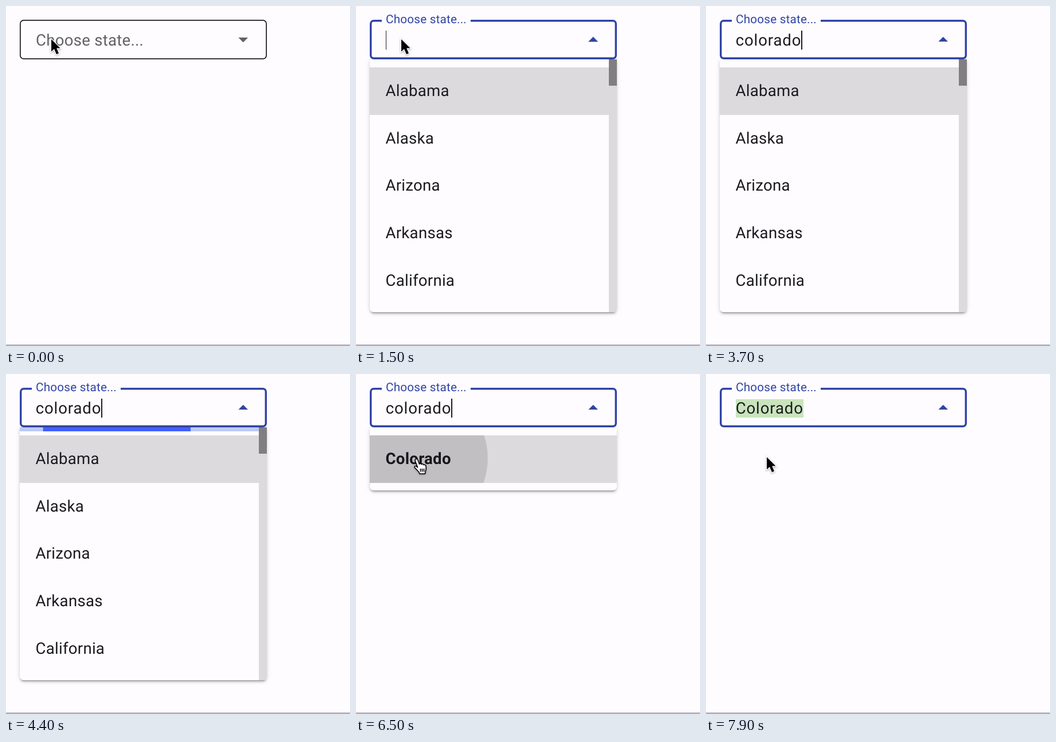
Write an HTML page that moves like this. It is 600 px wide and 593 px high and loops after 8 s.

```html
<!DOCTYPE html>
<html lang="en">
<head>
<meta charset="utf-8">
<title>State picker</title>
<style>
  :root { --paper: #fefcff; --ink: #1b1b1f; --primary: #3144a5; }
  html, body { margin: 0; width: 100%; height: 100%; overflow: hidden; background: var(--paper); }
  #stage {
    position: relative; width: 600px; height: 593px; overflow: hidden;
    font: 27.6px/32px Roboto, sans-serif; letter-spacing: .26px; color: var(--ink);
    text-rendering: geometricPrecision;
  }
  #stage div, #stage svg { position: absolute; box-sizing: border-box; }
  #rule { left: 0; top: 591px; width: 600px; height: 1px; background: #505054; }

  #outline { left: 24.2px; top: 24px; width: 431px; height: 69px; border-radius: 6.9px; box-shadow: inset 0 0 0 1.72px var(--ink); }
  #notch { left: 45px; top: 22px; width: 155px; height: 8px; background: var(--paper); }
  #label { left: 51.7px; top: 44px; color: #626166; white-space: nowrap; transform-origin: 0 50%; }
  #value { left: 51.7px; top: 44px; height: 32px; display: flex; letter-spacing: .8625px; }
  #caret { width: 1.7px; height: 33px; margin-top: -.7px; background: var(--ink); }
  #arrow { left: 405px; top: 54.8px; width: 17.4px; height: 8.7px; background: #626166; clip-path: polygon(0 0, 100% 0, 50% 100%); }
  .focused #outline { box-shadow: inset 0 0 0 3.45px var(--primary); }
  .focused #label { color: var(--primary); }
  .focused #arrow { background: var(--primary); transform: translateY(-1.2px) scaleY(-1); }
  .selected #text { background: #c9e4bd; }

  #panel {
    left: 24.2px; top: 93.3px; width: 431px; background: var(--paper);
    border-radius: 0 0 6.9px 6.9px; transform-origin: 50% 0;
    box-shadow: 0 5.2px 1.7px -3.4px #0003, 0 3.4px 3.4px #00000024, 0 1.7px 8.6px #0000001f;
  }
  #clip { inset: 0; overflow: hidden; border-radius: inherit; }
  .bone { left: 14px; width: 403px; height: 54.5px; border-radius: 6px; background: #e8e6e7; overflow: hidden; }
  .sheen { left: -135px; top: 0; width: 135px; height: 100%; background: linear-gradient(90deg, #eae9f000, #eae9f0 65%); }
  .row { left: 0; width: 100%; height: 82.76px; padding-left: 27.5px; line-height: 82.76px; overflow: hidden; }
  .row.active { background: #dcdadd; }
  #match { font-weight: 700; top: 13.8px; }
  #ripple { left: -369px; top: -410px; width: 900px; height: 900px; border-radius: 50%; background: #0000001f; }
  #track { right: 0; top: 0; width: 14px; height: 100%; background: #dcdadd; }
  #thumb { left: 0; top: 0; width: 14px; height: 46px; background: #807e81; }
  #progress { left: 0; top: 0; width: 100%; height: 6.9px; background: #bdcaf4; overflow: hidden; }
  .slide, .slide div { top: 0; width: 100%; height: 100%; }
  .slide div { left: 0; background: #4460fb; }
  #primary { left: -145.166611%; }
  #secondary { left: -54.888891%; }
  #pointer { left: 0; top: 0; width: 40px; height: 40px; overflow: visible; filter: drop-shadow(0 1.5px 1.5px #0005); }
</style>
</head>
<body>
<div id="stage">
  <div id="rule"></div>
  <div id="outline"></div>
  <div id="notch"></div>
  <div id="label">Choose state...</div>
  <div id="value"><span id="text"></span><span id="caret"></span></div>
  <div id="arrow"></div>
  <div id="panel"><div id="clip">
    <div id="skeleton" style="inset:0"></div>
    <div id="options" style="inset:0"></div>
    <div id="match" class="row active">Colorado<div id="ripple"></div></div>
    <div id="progress">
      <div id="primary" class="slide"><div></div></div>
      <div id="secondary" class="slide"><div></div></div>
    </div>
    <div id="track"><div id="thumb"></div></div>
  </div></div>
  <svg id="pointer">
    <path id="cursor" d="M0 0V21.5L5 17L9 26.3L13 24.6L9.2 15.6H15.6Z" stroke="#fff" stroke-width="2.6" paint-order="stroke"/>
    <g id="hand" transform="translate(-4.5 2)" fill="#fff" stroke="#000" stroke-width="1.6" stroke-linejoin="round">
      <path d="M3 1.2C4.8 .6 6 1.8 6.6 3.6L9 10.2C9.6 8.6 12.4 8.8 12.8 10.6C13.8 9.4 16.2 9.8 16.6 11.6C18 10.8 20.2 11.6 20.4 13.4C20.8 16 21 20 19.5 23L19 27H9.5C9 24.6 7 22.5 5 20.5L1 16.2C-.2 14.6 1.6 12.8 3.6 13.8L6 15.8L1.8 4.8C1.2 3.2 1.6 1.8 3 1.2Z"/>
      <path d="M11 18V23.5M14 18V23.5M17 18V23.5"/>
    </g>
  </svg>
</div>
<script>
const LOOP = 8000, STEP = 100;
const FOCUS = 300, LOADED = 1500, SEARCH = 3828, FILTERED = 5000, POINT = 5900, PICK = 6800;
const typed = [[FOCUS, 0], [1700, 1], [1900, 2], [2100, 3], [2300, 4], [2800, 5], [3000, 6], [3200, 7], [3400, 8]];

const $ = id => document.getElementById(id);
const show = (id, on) => { $(id).style.display = on ? '' : 'none'; };
const add = (parent, className, top, html) =>
  parent.insertAdjacentHTML('beforeend', `<div class="${className}" style="top:${top}px">${html}</div>`);

['Alabama', 'Alaska', 'Arizona', 'Arkansas', 'California', 'Colorado'].forEach((name, i) =>
  add($('options'), i ? 'row' : 'row active', 13.8 + i * 82.76, name));
for (let i = 0; i < 3; i++) add($('skeleton'), 'bone', 35.8 + i * 75.85, '<div class="sheen"></div>');

const motions = [];
function move(el, frames, delay, duration, easing = 'linear', fill = 'both') {
  const motion = el.animate(frames, { delay, duration, easing, fill });
  motion.pause();
  motions.push(motion);
}

// Each step: offset, value, control points of the easing to the next step
const track = (fn, unit, steps) => steps.map(([offset, value, curve]) => ({
  offset, transform: `${fn}(${value}${unit})`, easing: curve ? `cubic-bezier(${curve})` : 'linear'
}));
function slide(el, shift, scale) {
  move(el, track('translateX', '%', shift), SEARCH, 2000);
  move(el.firstChild, track('scaleX', '', scale), SEARCH, 2000);
}
slide($('primary'),
  [[0, 0], [.2, 0, '.5,0,.701732,.495819'], [.5915, 83.67142, '.302435,.381352,.55,.956333'], [1, 200.611057]],
  [[0, .08], [.3665, .08, '.334731,.12482,.785844,1'], [.6915, .661479, '.06,.11,.6,1'], [1, .08]]);
slide($('secondary'),
  [[0, 0, '.15,0,.515058,.409685'], [.25, 37.651913, '.31033,.284058,.8,.733712'],
   [.4835, 84.386165, '.4,.627035,.6,.902026'], [1, 160.277782]],
  [[0, .08, '.205028,.057051,.57661,.453971'], [.1915, .457104, '.152313,.196432,.648374,1.004315'],
   [.4415, .72796, '.257759,-.003163,.211762,1.38179'], [1, .08]]);

move($('label'), { transform: ['none', 'translateY(-36.9px) scale(.75)'] }, 284, 150, 'cubic-bezier(.4,0,.2,1)');
move($('panel'), { transform: ['scale(.8)', 'none'], opacity: [0, 1] }, 334, 120, 'cubic-bezier(0,0,.2,1)');
move($('panel'), { opacity: [1, 0] }, 6749, 100, 'linear', 'forwards');
move($('ripple'), { transform: ['scale(0)', 'none'] }, 6480, 225, 'cubic-bezier(0,0,.2,1)');
move($('pointer'), { transform: ['translate(79px,58px)', 'translate(106px,145px)'] }, 5850, 500, 'ease-in-out');
for (const sheen of document.querySelectorAll('.sheen'))
  move(sheen, { transform: ['none', 'translateX(538px)'] }, 334, 717);

function draw(t) {
  const focused = t >= FOCUS, loaded = t >= LOADED, filtered = t >= FILTERED, picked = t >= PICK;
  const [edited, length] = typed.filter(([time]) => time <= t).pop() || typed[0];
  const loading = t >= SEARCH && !filtered;

  $('stage').className = (focused ? 'focused ' : '') + (picked ? 'selected' : '');
  $('text').textContent = picked ? 'Colorado' : 'colorado'.slice(0, length);
  show('notch', focused);
  show('caret', focused && !picked && Math.floor((t - edited) / 500) % 2 === 0);

  $('panel').style.height = (filtered ? 110.4 : loaded ? 441.4 : 276.2) + 'px';
  show('skeleton', !loaded);
  show('options', loaded && !filtered);
  show('track', loaded && !filtered);
  show('match', filtered);
  show('progress', loading);

  const onOption = t >= 6100 && t <= PICK;
  show('pointer', t < 1700 || t >= POINT);
  show('hand', onOption);
  show('cursor', !onOption);
  for (const motion of motions) motion.currentTime = t;
}

const start = performance.now();
function tick() {
  const elapsed = (performance.now() - start) % LOOP;
  draw(Math.floor(elapsed / STEP) * STEP);
  requestAnimationFrame(tick);
}
tick();
</script>
</body>
</html>
```
